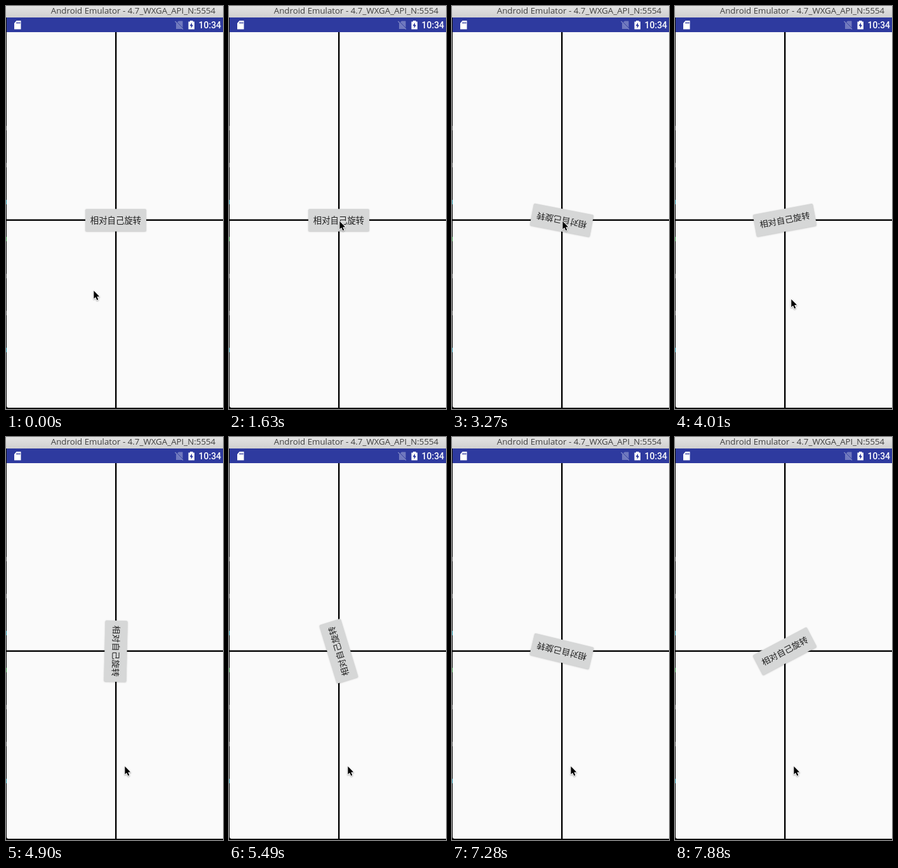
Animation of 342 by 632 pixels, one loop 8000 ms. Source, as an HTML page with a canvas:

```html
<!DOCTYPE html>
<html lang="zh">
<head>
<meta charset="utf-8">
<title>Rotating button</title>
<style>
  html, body { margin: 0; width: 342px; height: 632px; overflow: hidden; background: #000; }
  canvas { display: block; }
</style>
</head>
<body>
<canvas id="stage" width="342" height="632"></canvas>
<script>
const ctx = document.getElementById('stage').getContext('2d');
const LOOP = 8000;
const TICK = 148.2;
const BLUE = '#2e3a9f';
const SPIN_START = 2231, SPIN_TIME = 2000;
const REST = { x: 138, y: 445 }, PRESS = { x: 174, y: 336 }, PARK = { x: 187, y: 515 };

const CARD = new Path2D('M16.5 23H23.5V36.5H13V27Z');
const SIM = new Path2D('M272 23.5H278.5V36H268V27.5Z');
const BOLT = new Path2D('M293 26L289.5 31.2H291.7V35L295 29.8H293Z');
const ARROW = new Path2D('M0 0V12.4L2.8 9.8L5 14.6L7 13.7L4.9 9.1L8.8 8.9Z');

function rect(color, x, y, w, h) {
  ctx.fillStyle = color;
  ctx.fillRect(x, y, w, h);
}

function fill(color, path) {
  ctx.fillStyle = color;
  ctx.fill(path);
}

function rounded(color, x, y, w, h, radius) {
  const path = new Path2D();
  path.roundRect(x, y, w, h, radius);
  fill(color, path);
}

function label(text, x, y, font, color, align = 'left') {
  ctx.font = font;
  ctx.fillStyle = color;
  ctx.textAlign = align;
  ctx.fillText(text, x, y);
}

function setShadow(color, blur, dy) {
  ctx.shadowColor = color;
  ctx.shadowBlur = blur;
  ctx.shadowOffsetY = dy;
}

function drawTitleBar() {
  const shade = ctx.createLinearGradient(0, 0, 0, 18);
  shade.addColorStop(0, '#e3e3e3');
  shade.addColorStop(1, '#d0d0d0');
  rect(shade, 0, 0, 342, 18);
  label('Android Emulator - 4.7_WXGA_API_N:5554', 200.5, 12,
        '13.3px "Open Sans", sans-serif', '#404040', 'center');
}

function drawStatusBar() {
  rect(BLUE, 1, 18, 341, 23);

  // memory card with contacts
  fill('#fff', CARD);
  for (let i = 0; i < 3; i++) rect(BLUE, 16.6 + i * 2.2, 25, 1.2, 2.8);

  // missing SIM
  fill('#7079be', SIM);
  ctx.lineWidth = 1.4;
  for (const [color, dx] of [[BLUE, 1], ['#7d85c4', 0]]) {
    ctx.strokeStyle = color;
    ctx.beginPath();
    ctx.moveTo(266.5 + dx, 24);
    ctx.lineTo(279 + dx, 36.5);
    ctx.stroke();
  }

  // charging battery
  rect('#fff', 287.5, 24.5, 9.5, 12);
  rect('#fff', 290, 23, 4.5, 2);
  fill(BLUE, BOLT);

  label('10:34', 303.5, 35, '500 14px Roboto, sans-serif', '#fff');
}

function drawScreen() {
  rect('#0c0c0c', 0, 0, 342, 632);
  rounded('#fafafa', 1, 41, 345, 589, [0, 0, 0, 3]);
  rect('#000', 172, 41, 2.4, 589);
  rect('#000', 0, 334.5, 342, 2.4);

  // desktop showing past the window's edge
  const specks = ['#555', '#555', '#1b8ba0', '#278a35'];
  for (let i = 0; i < 7; i++) rect(specks[i % 4], 0, 188 + i * 58, 1, 7);

  drawTitleBar();
  drawStatusBar();
}

function drawButton(angle) {
  ctx.save();
  ctx.translate(173, 335.8);
  ctx.rotate(angle);
  setShadow('rgba(0,0,0,.22)', 2, 0.7);
  rounded('#d6d7d7', -48, -17.6, 96, 35.2, 2);
  setShadow('transparent', 0, 0);
  label('相对自己旋转', 0, 4.8, '500 13.4px "Noto Sans CJK SC", "Noto Sans CJK", sans-serif',
        '#212121', 'center');
  ctx.restore();
}

function drawCursor({ x, y }) {
  ctx.save();
  ctx.translate(x + 0.4, y + 1.6);
  setShadow('rgba(0,0,0,.35)', 2, 1);
  ctx.lineJoin = 'round';
  ctx.lineWidth = 2;
  ctx.strokeStyle = '#fff';
  ctx.stroke(ARROW);
  setShadow('transparent', 0, 0);
  fill('#000', ARROW);
  ctx.restore();
}

// The screen refreshes only once per tick.
const tick = (t, start) => Math.floor((t - start) / TICK);
const progress = (t, start, steps) =>
  Math.max(0, Math.min((tick(t, start) + 1) / steps, 1));

function bezier(a, b, c, d, p) {
  const q = 1 - p;
  return q * q * q * a + 3 * q * q * p * b + 3 * q * p * p * c + p * p * p * d;
}

function cursorAt(t) {
  if (t < 3411) {
    // sweep over the button and curl back onto it
    const p = 1 - (1 - progress(t, 443, 9)) ** 1.7;
    return { x: bezier(REST.x, 140, 320, PRESS.x, p),
             y: bezier(REST.y, 70, 490, PRESS.y, p) };
  }
  const p = progress(t, 3411, 8);
  const ease = p * p * (3 - 2 * p);
  return { x: PRESS.x + (PARK.x - PRESS.x) * ease,
           y: PRESS.y + (PARK.y - PRESS.y) * ease };
}

// Each turn speeds up and slows down along a cosine.
function angleAt(t) {
  const shown = 2230 + tick(t, 2225) * 148.5;
  const turn = Math.max(0, shown - SPIN_START) / SPIN_TIME % 1;
  return Math.PI * (1 - Math.cos(Math.PI * turn));
}

function frame(now) {
  const t = now % LOOP;
  drawScreen();
  drawButton(angleAt(t));
  drawCursor(cursorAt(t));
  requestAnimationFrame(frame);
}
requestAnimationFrame(frame);
</script>
</body>
</html>
```
